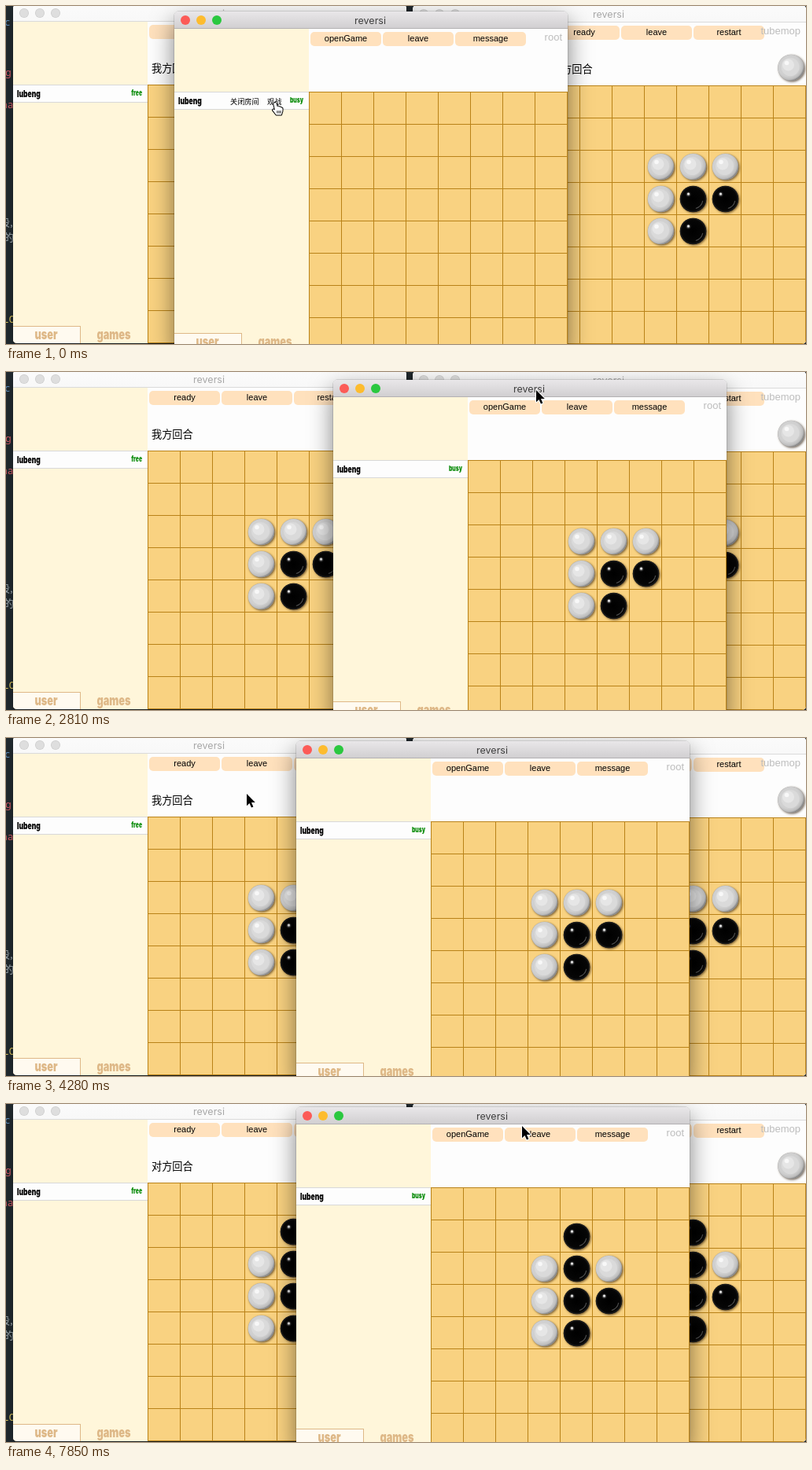
These frames come from a looping animation (1017 by 430 pixels, 7990 ms). An HTML page with a canvas:

```html
<!DOCTYPE html>
<html lang="en">
<head>
<meta charset="utf-8">
<title>Board game windows</title>
<style>
  html, body { margin: 0; width: 100%; height: 100%; overflow: hidden; background: #222b30; }
  canvas { display: block; }
</style>
</head>
<body>
<canvas id="stage" width="1017" height="430"></canvas>
<script>
const ctx = document.getElementById('stage').getContext('2d');
const LOOP = 7990;
const CELL = 41;
const SIDE = 171;
const SANS = '"Liberation Sans", Arial, sans-serif';
const CJK = '"Noto Sans CJK SC", "Noto Sans CJK", sans-serif';
const UI = 'Inter, Roboto, sans-serif';

// Time-stamped states: [start ms, ...values]
const POINTER = [
  [0, 338, 122], [140, 337, 121], [1190, 372, 117], [1330, 402, 100], [1480, 430, 82],
  [1620, 444, 71], [2070, 452, 48], [2210, 460, 28], [2360, 463, 19],
  [2660, 580, 22], [2810, 674, 23], [2960, 688, 23], [3110, 655, 21], [3260, 621, 18],
  [3410, 618, 15], [3550, 470, 68], [3700, 350, 92], [3990, 334, 84], [4130, 314, 75],
  [4280, 306, 71], [5030, 345, 88], [5180, 383, 112], [5480, 361, 178], [5630, 361, 182],
  [5920, 374, 177], [6070, 370, 171], [6220, 366, 168], [6810, 420, 148], [6960, 510, 116],
  [7100, 590, 86], [7250, 619, 74], [7700, 642, 46], [7850, 656, 28]
];
const DRAG = [
  [0, 214, 7], [2660, 312, 9], [2810, 416, 10], [2960, 438, 11],
  [3110, 410, 9], [3260, 372, 8], [3410, 369, 4]
];
const FRONT = [[0, 'watch'], [4580, 'left'], [7550, 'watch']];
const WATCH_START = 590;
const HOVER_END = 1330;
const MOVE = 6520;

// Rows of the board; W, B or empty
const BEFORE = ['', '', '...WWW', '...WBB', '...WB'];
const AFTER = ['', '....B', '...WBW', '...WBB', '...WB'];
const MINE = '我方回合', THEIRS = '对方回合';

const at = (list, t) => list.reduce((found, row) => (row[0] <= t ? row : found)).slice(1);

function rect(x, y, w, h, color) {
  ctx.fillStyle = color;
  ctx.fillRect(x, y, w, h);
}

function disc(x, y, r, color) {
  ctx.fillStyle = color;
  ctx.beginPath();
  ctx.arc(x, y, r, 0, Math.PI * 2);
  ctx.fill();
}

function text(str, x, y, font, color, align = 'left') {
  ctx.font = font;
  ctx.fillStyle = color;
  ctx.textAlign = align;
  ctx.fillText(str, x, y);
}

// Heavy condensed face
function poster(str, x, y, size, color, align) {
  ctx.save();
  ctx.translate(x, y);
  ctx.scale(0.71, 1);
  text(str, 0, 0, `900 ${size}px ${UI}`, color, align);
  ctx.restore();
}

function radial(x, y, r, stops) {
  const g = ctx.createRadialGradient(x, y, 0, x, y, r);
  stops.forEach(([k, c]) => g.addColorStop(k, c));
  return g;
}

function piece(x, y, white) {
  ctx.save();
  ctx.shadowColor = 'rgba(40,20,0,.65)';
  ctx.shadowBlur = 3;
  ctx.shadowOffsetX = ctx.shadowOffsetY = 1.2;
  disc(x, y, 16.8, white ? '#a9a9a9' : '#080808');
  ctx.restore();
  if (white) {
    disc(x, y, 16.6, radial(x - 3, y - 3, 20, [[0, '#d6d6d6'], [0.72, '#cfcfcf'], [0.9, '#bcbcbc'], [1, '#858585']]));
    disc(x - 1, y - 1, 11.5, '#dadada');
    disc(x - 3.5, y - 3.5, 7.5, '#e6e6e6');
    disc(x - 5.5, y - 6, 2.8, '#f8f8f8');
  } else {
    disc(x, y, 16.6, radial(x, y, 17, [[0, '#000'], [0.85, '#060606'], [1, '#2a2a2a']]));
    ctx.strokeStyle = '#4a4a4a';
    ctx.lineWidth = 1.2;
    ctx.beginPath();
    ctx.arc(x, y, 12.5, 0.2, 1.3);
    ctx.stroke();
    disc(x - 6, y - 6, 4.2, radial(x - 6, y - 6, 4.2, [[0, '#aaa'], [0.4, '#555'], [1, 'rgba(0,0,0,0)']]));
    disc(x - 6, y - 6.5, 1.5, '#e8e8e8');
  }
}

function board(x, y, rows) {
  rect(x, y, CELL * 8 + 1, CELL * 8 + 1, '#f9d281');
  for (let i = 0; i <= 8; i++) {
    rect(x + i * CELL, y, 1, CELL * 8 + 1, '#b98218');
    rect(x, y + i * CELL, CELL * 8 + 1, 1, '#b98218');
  }
  rows.forEach((row, r) => [...row].forEach((c, k) => {
    if (c !== '.') piece(x + k * CELL + 21.5, y + r * CELL + 21.5, c === 'W');
  }));
}

function titleBar(active) {
  const g = ctx.createLinearGradient(0, 0, 0, 22);
  g.addColorStop(0, active ? '#e9e7e9' : '#fbfbfb');
  g.addColorStop(1, active ? '#d0ced0' : '#f8f8f8');
  rect(0, 0, 500, 22, g);
  rect(0, 21, 500, 1, active ? '#b3b1b3' : '#dadada');
  const lights = active ? ['#fc5b57', '#fdbc2e', '#2ac83f'] : ['#cdcdcd', '#cdcdcd', '#cdcdcd'];
  lights.forEach((c, i) => {
    disc(14 + i * 20, 11, 6, c);
    if (!active) disc(14 + i * 20, 11, 5.2, '#dedede');
  });
  text('reversi', 249, 15.5, `12.5px ${UI}`, active ? '#3f3f3f' : '#a8a8a8', 'center');
}

function sidebar(w) {
  rect(0, 22, SIDE, 409, '#fff6da');
  rect(0, 102, SIDE, 23, '#fdfdfd');
  rect(0, 102, SIDE, 1, '#d8d8d8');
  rect(0, 124, SIDE, 1, '#d8d8d8');
  poster('lubeng', 5, 118, 12, '#000');
  poster(w.status, 164, 116, 9.5, '#078a07', 'right');
  if (w.hover) {
    text('关闭房间', 71, 117.5, `500 9.2px ${CJK}`, '#000');
    text('观战', 118, 117.5, `500 9.2px ${CJK}`, '#000');
  }
  rect(0, 409, 86, 22, '#deb887');
  rect(0, 410, 85, 21, '#fffaf0');
  poster('user', 42, 426, 18, '#deb887', 'center');
  poster('games', 128, 426, 18, '#deb887', 'center');
}

function gameWindow(w, active) {
  ctx.save();
  ctx.translate(w.x, w.y);
  ctx.beginPath();
  ctx.roundRect(0, 0, 500, 431, 5);
  ctx.save();
  ctx.shadowColor = `rgba(0,0,0,${active ? 0.5 : 0.32})`;
  ctx.shadowBlur = active ? 30 : 24;
  ctx.shadowOffsetY = active ? 12 : 8;
  ctx.fillStyle = '#fdfdfd';
  ctx.fill();
  ctx.restore();
  ctx.strokeStyle = 'rgba(0,0,0,.22)';
  ctx.lineWidth = 1;
  ctx.stroke();
  ctx.clip();
  rect(0, 0, 500, 431, '#fdfdfd');
  titleBar(active);
  sidebar(w);
  w.buttons.forEach((label, i) => {
    const x = 173 + i * 92;
    ctx.fillStyle = '#ffe1bd';
    ctx.beginPath();
    ctx.roundRect(x, 26, 90, 18, 5);
    ctx.fill();
    text(label, x + 45, 38, `11px ${SANS}`, '#000', 'center');
  });
  text(w.user, 493, 36.5, `13px ${SANS}`, '#bdbdbd', 'right');
  if (w.turn) {
    text(w.turn, 176, 86, `500 13.2px ${CJK}`, '#000');
    piece(481, 79.5, w.white);
  }
  board(SIDE, 102, w.rows);
  ctx.restore();
}

function editor() {
  rect(0, 0, 1017, 430, '#222b30');
  const mono = '13px "Noto Sans Mono", monospace';
  text('c', -2, 25, mono, '#6699cc');
  text('g', -1, 89, mono, '#e0606c');
  text('na', -6, 130, mono, '#e0606c');
  text('段,', -8, 280, `13px ${CJK}`, '#a9b4ba');
  text('的', -3, 299, `13px ${CJK}`, '#a9b4ba');
  text('LO', -4, 403, mono, '#e6cf62');
}

function outline(path, fill, stroke, width) {
  ctx.lineJoin = 'round';
  ctx.lineWidth = width;
  ctx.strokeStyle = stroke;
  ctx.stroke(path);
  ctx.fillStyle = fill;
  ctx.fill(path);
}

const ARROW = new Path2D('M0 0V15.2L3.5 12L6 17.6L8.4 16.5L6 11H10.8Z');
const HAND = new Path2D('M3 1.5Q4.5 0 5.6 2L6.8 6Q8.5 5 9.3 6.6Q11 5.8 11.6 7.4Q13.4 7 13.6 9L13.4 12L12 16.5H5.5L1 10.6Q1.3 8.6 4 10.4L2.3 3Q2.1 2 3 1.5Z');

function pointer(x, y, hand) {
  ctx.save();
  ctx.translate(x, y);
  if (hand) {
    outline(HAND, '#fff', '#000', 2);
    ctx.lineWidth = 0.9;
    ctx.stroke(new Path2D('M6.9 11.2V14.5M9 11.2V14.5M11 11.2V14.5'));
  } else {
    outline(ARROW, '#000', '#fff', 2);
  }
  ctx.restore();
}

function draw(t) {
  const [x, y] = at(DRAG, t);
  const [front] = at(FRONT, t);
  const moved = t >= MOVE;
  const rows = moved ? AFTER : BEFORE;
  const play = ['ready', 'leave', 'restart'];
  const right = { x: 517, y: -1, user: 'tubemop', status: 'free', buttons: play, rows, turn: moved ? MINE : THEIRS, white: true };
  const left = { x: 9, y: -2, user: 'wobicle', status: 'free', buttons: play, rows, turn: moved ? THEIRS : MINE, white: false };
  const watch = {
    x, y, user: 'root', status: 'busy', buttons: ['openGame', 'leave', 'message'],
    rows: t < WATCH_START ? [] : rows, hover: t < HOVER_END
  };
  editor();
  gameWindow(right, false);
  const leftFront = front === 'left';
  gameWindow(leftFront ? watch : left, false);
  gameWindow(leftFront ? left : watch, true);
  pointer(...at(POINTER, t), t < 1190);
}

const start = performance.now();
function tick() {
  draw((performance.now() - start) % LOOP);
  requestAnimationFrame(tick);
}
tick();
</script>
</body>
</html>
```
